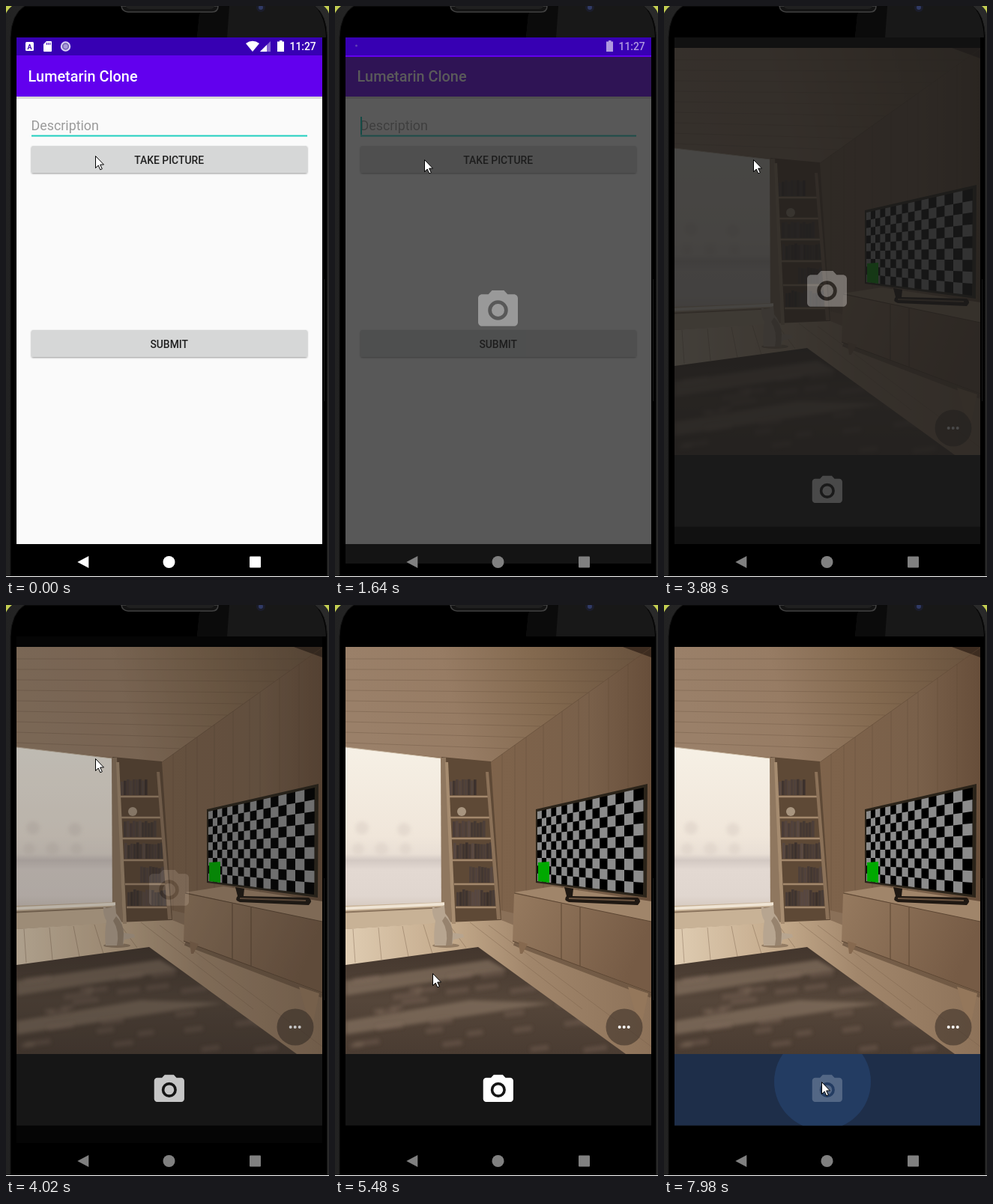
An HTML page that plays this animation: 431 by 763 pixels, repeating every 8 s.

```html
<!DOCTYPE html>
<html lang="en">
<head>
<meta charset="utf-8">
<title>Camera app</title>
<style>
html, body { margin: 0; width: 100%; height: 100%; overflow: hidden; background: #000; }
svg { display: block; width: 431px; height: 763px; }
text { font-family: Roboto, sans-serif; }
.label { font-size: 13.9px; font-weight: 500; text-anchor: middle; fill: #202020; }
</style>
</head>
<body>
<svg viewBox="0 0 431 763">
<defs>
  <linearGradient id="ceil" x2="1" y2="-.1">
    <stop offset="0" stop-color="#9a8069"/><stop offset=".3" stop-color="#977c64"/><stop offset=".6" stop-color="#83694f"/><stop offset="1" stop-color="#66503c"/>
  </linearGradient>
  <linearGradient id="wall">
    <stop offset="0" stop-color="#8a6e54"/><stop offset=".4" stop-color="#80644b"/><stop offset=".8" stop-color="#79604a"/><stop offset="1" stop-color="#674e3a"/>
  </linearGradient>
  <linearGradient id="sky" x2="0" y2="1">
    <stop offset="0" stop-color="#f6f0e5"/><stop offset=".55" stop-color="#f0e6da"/><stop offset=".66" stop-color="#e9dfd5"/>
    <stop offset=".7" stop-color="#d3c9c3"/><stop offset=".76" stop-color="#e3d9d2"/><stop offset=".92" stop-color="#e0d6cf"/><stop offset="1" stop-color="#d4c8be"/>
  </linearGradient>
  <linearGradient id="floor">
    <stop offset="0" stop-color="#dfccb2"/><stop offset=".35" stop-color="#c3a98a"/><stop offset=".6" stop-color="#a1866b"/><stop offset="1" stop-color="#8d7259"/>
  </linearGradient>
  <linearGradient id="rug" x2="0" y2="1">
    <stop offset="0" stop-color="#43362d"/><stop offset=".5" stop-color="#55463a"/><stop offset="1" stop-color="#4a3c32"/>
  </linearGradient>
  <linearGradient id="front" x2="1" y2=".3">
    <stop offset="0" stop-color="#967a5f"/><stop offset="1" stop-color="#765b45"/>
  </linearGradient>
  <linearGradient id="rim"><stop offset="0" stop-color="#222"/><stop offset=".5" stop-color="#3c3c3c"/><stop offset="1" stop-color="#292929"/></linearGradient>
  <filter id="soft"><feGaussianBlur stdDeviation="2.5"/></filter>
  <filter id="shade" x="-5%" y="-20%" width="110%" height="150%"><feDropShadow dx="0" dy="1" stdDeviation=".8" flood-opacity=".4"/></filter>
  <clipPath id="button"><rect x="34" y="187" width="368" height="36" rx="2"/></clipPath>
  <clipPath id="panel"><rect x="14" y="600" width="408" height="95.500"/></clipPath>
  <clipPath id="rugClip"><path d="M14 481L191 457 388 600H14Z"/></clipPath>
  <clipPath id="view"><rect x="14" y="56" width="408" height="544"/></clipPath>
  <path id="cam" d="M9 2L7.17 4H4C2.9 4 2 4.9 2 6V18C2 19.1 2.9 20 4 20H20C21.1 20 22 19.1 22 18V6C22 4.9 21.1 4 20 4H16.83L15 2ZM12 17A5 5 0 1 1 12 7A5 5 0 1 1 12 17ZM12 8.8A3.2 3.2 0 1 0 12 15.2A3.2 3.2 0 1 0 12 8.8Z" fill-rule="evenodd"/>
</defs>

<!-- Phone body -->
<path d="M0 0H12L0 12ZM431 0H421L431 12Z" fill="#c4cf52"/>
<path d="M0 763V10Q2 5 8 0H424Q429 4 431 10V763Z" fill="url(#rim)"/>
<path d="M6 763V42Q7 11 25 0H412Q428 12 428.500 42V763Z" fill="#000" stroke="#151515"/>
<path d="M255 42L258 12 264 0H412Q426 14 427 42Z" fill="#181818"/>
<path d="M255 42L258 12 264 0H298L295 42Z" fill="#0b0b0b"/>
<path d="M154 0Q155 8 163 8H275Q283 8 283 0Z" fill="#141414" stroke="#424242" stroke-width="1.500"/>
<path d="M160 0Q161 4 166 4H272Q277 4 278 0Z" fill="#202020"/>
<circle cx="340" cy="2" r="6" fill="#1b1d2b"/><circle cx="340" cy="2" r="3" fill="#303a66"/>
<path d="M424.500 365V528" stroke="#191919"/>
<path d="M0 762.500H431" stroke="#fff"/>

<!-- Form -->
<rect x="14" y="42" width="408" height="677" fill="#fafafa"/>
<rect x="14" y="121" width="408" height="3" fill="#000" opacity=".14"/>
<rect x="14" y="66" width="408" height="55" fill="#6200ee"/>
<rect x="14" y="42" width="408" height="24" fill="#3700b3"/>
<text x="29.500" y="101" font-size="19.860" font-weight="500" fill="#fff">Lumetarin Clone</text>
<text x="33.500" y="166" font-size="17.870" fill="#9b9b9b">Description</text>
<path d="M34 173.500H402" stroke="#20cfc0" stroke-width="1.800"/>
<path id="caret" d="M35 148V172" stroke="#03c9b6" stroke-width="2"/>
<g fill="#d6d7d7" filter="url(#shade)"><rect x="34" y="187" width="368" height="36" rx="2"/><rect x="34" y="433" width="368" height="36" rx="2"/></g>
<circle id="tap" cx="137.500" cy="205" r="30" opacity=".1" clip-path="url(#button)"/>
<text class="label" x="217.700" y="211">TAKE PICTURE</text>
<text class="label" x="217.700" y="456.500">SUBMIT</text>

<!-- Opening camera -->
<g id="splash">
  <rect x="14" y="42" width="408" height="677" fill="#1c1c1c"/>
  <use href="#cam" transform="translate(185.700 348.700) scale(2.650)" fill="#757575"/>
</g>
<path id="bands" d="M14 42H422V56H14ZM14 696H422V719H14Z" fill="#161616"/>

<g id="icons" fill="#fff">
  <rect x="26" y="48" width="11" height="12" rx="1.500"/>
  <text x="31.500" y="57.500" font-size="9" font-weight="700" text-anchor="middle" fill="#3700b3">A</text>
  <path d="M54 47H60Q61 47 61 48V60Q61 61 60 61H51Q50 61 50 60V51Z"/>
  <path d="M54.500 49V52M56.700 49V52M58.900 49V52" stroke="#3700b3"/>
  <circle cx="79.500" cy="54" r="5.700" fill="#7463b5" stroke="#d9d1f2" stroke-width="2"/><circle cx="79.500" cy="54" r="3" fill="#a99ad9"/>
  <path d="M320 50Q329 43.500 338 50L329 61Z"/>
  <path d="M353 47V61H339Z" opacity=".4"/><path d="M348 52V61H339Z"/>
</g>
<circle id="dot" cx="28.500" cy="53" r="1.500" fill="#8c7bb8" opacity=".5"/>
<g id="clock" fill="#fff">
  <path d="M365 46H368.500V47.500H371V61H362V47.500H365Z"/>
  <text x="378.500" y="59" font-size="13.900" font-weight="500">11:27</text>
</g>

<!-- Viewfinder -->
<g id="camera">
  <rect x="14" y="42" width="408" height="677"/>
  <g clip-path="url(#view)">
    <path d="M14 56H422V600H14Z" fill="url(#wall)"/>
    <path d="M14 56H422L208 210 145 204 14 190Z" fill="url(#ceil)"/>
    <path d="M384 56H422V70Z" fill="#3d2c20"/>
    <path id="boards" stroke="#4f3c2c" stroke-width=".8" opacity=".3" fill="none"/>
    <path d="M422 57L208 210" stroke="#5d4734" opacity=".5"/>
    <path d="M142 203L208 209 222 425H142Z" fill="#5e4936"/>
    <path d="M14 190L142 205V400L14 406Z" fill="url(#sky)"/>
    <g fill="#ddd2c8" opacity=".6" filter="url(#soft)">
      <circle cx="36" cy="298" r="9"/><circle cx="31" cy="326" r="8"/><circle cx="62" cy="326" r="9"/><circle cx="92" cy="300" r="9"/><circle cx="94" cy="326" r="8"/>
    </g>
    <path d="M14 190L142 205" stroke="#c9b8a2"/>
    <path d="M141 204H148L156 425H142Z" fill="#8f775f"/>
    <path d="M14 402L146 397V425L14 433Z" fill="#c8b296"/>
    <path d="M14 405.500L146 399.500" stroke="#efe4d4" stroke-width="4"/>
    <path d="M14 410.500L148 404" stroke="#8b745d" stroke-width="2"/>
    <path d="M14 433L150 424 222 421 240 424 422 440V600H14Z" fill="url(#floor)"/>
    <path d="M58 431L62 474M24 433L27 478M90 429L98 470M118 427L130 466M150 424L175 458M180 424L330 540M205 428L422 590" stroke="#755d46" opacity=".4" fill="none"/>
    <path d="M222 408L239 412V428L222 421Z" fill="#8a7058"/>
    <path d="M14 481L191 457 388 600H14Z" fill="url(#rug)"/>
    <g id="streaks" clip-path="url(#rugClip)"></g>
    <g id="books"></g>
    <path d="M152 256H205M153 284H208M155 312H211M157 341H213M159 373H216M161 404H218" stroke="#a3886c" stroke-width="2.500"/>
    <circle cx="169" cy="276" r="6" fill="#a8957f"/>
    <path d="M147 210H151L161 426H156Z" fill="#a68c70"/><path d="M201 223H205L221 420H216Z" fill="#8b7158"/>
    <!-- Cat -->
    <ellipse cx="148" cy="455" rx="18" ry="3" fill="#765f4b" opacity=".6"/>
    <path d="M130 403L134 405 140 404 146 401 147 412Q156 422 157 438L171 440 172 444 158 447 156 455H133Q131 440 134 422Q129 414 130 403Z" fill="#b7a590"/>
    <path d="M147 416Q157 426 157 439L156 455H148Q152 436 143 422Z" fill="#97836e"/>
    <!-- Sideboard and television -->
    <path d="M239 384L290 376 422 396V424Z" fill="#a0856a"/>
    <path d="M239 452L422 522" stroke="#5c4734" stroke-width="6" opacity=".6"/>
    <path d="M239 385L422 423V518L237 449Z" fill="url(#front)"/>
    <path d="M239 385L422 423M302 399V473M327 404V482M237 449L422 518" stroke="#5c4633" fill="none"/>
    <path d="M245 449L257 453 250 466H247Z" fill="#86694f"/><path d="M391 510L418 519 410 557 403 554Z" fill="#94775b"/>
    <path d="M306 377L318 379 317 389 404 391Q410 395 404 401L312 397Q304 394 309 389Z" fill="#1f1812"/>
    <path d="M312 392L400 395" stroke="#6c5541" stroke-width="2"/>
    <path d="M268 273L417 239 416 391 268 371Z" fill="#2b241a"/>
    <path d="M270 276L412 244 411 387 270 369Z"/>
    <path id="checks" fill="#8b8b8b"/>
    <path d="M271 344L286 343 286 371 271 369Z" fill="#00a900"/>
  </g>
  <circle cx="386" cy="564" r="24.500" fill="#3d3129" opacity=".6"/>
  <g fill="#fff"><circle cx="379.700" cy="564" r="2"/><circle cx="385.700" cy="564" r="2"/><circle cx="391.700" cy="564" r="2"/></g>
  <rect x="14" y="600" width="408" height="95.500" fill="#151515"/>
  <g id="press" clip-path="url(#panel)">
    <rect x="14" y="600" width="408" height="96" fill="#1e2e49"/>
    <circle id="wave" cx="211.500" cy="637" fill="#233c62"/>
  </g>
  <use id="shutter" href="#cam" transform="translate(193.700 623.800) scale(2.010)" fill="#fff"/>
</g>

<g id="nav" fill="#fff">
  <path d="M95.300 743L110.300 735V751Z"/>
  <circle cx="217.500" cy="743" r="8"/>
  <rect x="325" y="735.500" width="15" height="15" rx="1"/>
</g>
<path id="cursor" d="M.5.5V16.500L4.200 13 6.800 18.800 9.300 17.700 6.700 12H11.500Z" fill="#fff" stroke="#000"/>
</svg>

<script>
const $ = id => document.getElementById(id);
const set = (id, attrs) => { for (const k in attrs) $(id).setAttribute(k, attrs[k]); };
const show = (id, on) => set(id, { visibility: on ? 'visible' : 'hidden' });

let seed = 7;
const rnd = () => (seed = seed * 16807 % 2147483647) / 2147483647;

function buildRoom() {
  let d = '';
  for (let i = 0; i < 9; i++) d += `M14 ${72 + i * 14}L${400 - i * 21} ${72 + i * 15}`;
  for (const x of [223, 240, 255, 278, 303, 325, 339, 365, 391]) d += `M${x} ${57 + (422 - x) * .715}V${x < 239 ? 410 : 384}`;
  set('boards', { d });

  // Perspective grid: 16 by 9 cells, the right edge nearer
  const point = (c, r) => {
    const u = c / 16, v = r / 9, k = u / (u + (1 - u) * 1.54);
    const top = 276 - 32 * k, bottom = 369 + 18 * k;
    return `${(270 + 141.5 * k).toFixed(1)} ${(top + (bottom - top) * v).toFixed(1)}`;
  };
  d = '';
  for (let c = 0; c < 16; c++)
    for (let r = c % 2; r < 9; r += 2)
      d += `M${point(c, r)}L${point(c + 1, r)} ${point(c + 1, r + 1)} ${point(c, r + 1)}Z`;
  set('checks', { d });

  const rows = [[153, 188, 254], [157, 200, 310], [158, 208, 339], [179, 213, 371], [162, 212, 402]];
  let books = '';
  for (const [x0, x1, y] of rows)
    for (let x = x0; x < x1; x += 4) {
      const h = 18 + rnd() * 4, l = 20 + rnd() * 11;
      books += `<rect x="${x}" y="${y - h}" width="3.600" height="${h}" fill="hsl(18 15% ${l}%)"/>`;
    }
  $('books').innerHTML = books;

  // Sunlight across the rug
  let streaks = '<path d="M14 502L205 474 230 488 14 522ZM14 556L180 528 290 532 14 574Z" fill="#8e7a68" opacity=".6" filter="url(#soft)"/><g filter="url(#soft)">';
  for (let i = 0; i < 30; i++) {
    const x = 14 + rnd() * 320, y = 490 + rnd() * 110, w = 12 + rnd() * 25;
    streaks += `<path d="M${x} ${y}l${w} ${-w * .13}" stroke="#8a7664" stroke-width="7" opacity=".3"/>`;
  }
  $('streaks').innerHTML = streaks + '</g>';
}

// Each row: start time, then the values held until the next row
const held = (rows, t) => rows.filter(r => r[0] <= t).pop();
const path = [
  [0, 119, 200], [140, 119, 205], [4820, 129, 243], [4950, 146, 294],
  [5090, 178, 350], [5220, 200, 408], [5340, 165, 462], [5480, 130, 492],
  [5600, 144, 517], [5880, 166, 578], [6000, 183, 632], [6150, 192, 634],
  [6270, 198, 635], [6420, 205, 636], [6550, 209, 636], [6700, 210, 637]
];
const opening = [[0, 0, 26], [1640, .725, 26], [2920, 1, 7], [3040, 1, 0]];
const fade = [[0, 0], [3880, .2], [4020, .75], [4140, 1]];
const pressing = [[0, 0, 0, 1], [7850, .6, 40, .6], [7980, 1, 64.5, .22]];

function draw(t) {
  const [, x, y] = held(path, t);
  set('cursor', { transform: `translate(${x} ${y})` });
  show('caret', t >= 140);
  show('tap', t >= 390 && t < 1060);
  show('icons', t < 1060);
  show('dot', t >= 1060 && t < 3040);
  show('clock', t < 3040);
  set('clock', { opacity: t < 1060 ? 1 : .6 });
  set('nav', { fill: t < 1210 ? '#fff' : '#808080' });

  const [, alpha, drop] = held(opening, t);
  set('splash', { opacity: alpha, transform: `translate(0 ${drop})` });
  show('bands', t >= 3040);
  set('camera', { opacity: held(fade, t)[1] });

  const [, tint, radius, icon] = held(pressing, t);
  set('press', { opacity: tint });
  set('wave', { r: radius });
  set('shutter', { opacity: icon });
}

buildRoom();
const start = performance.now();
function tick() {
  draw((performance.now() - start) % 8000);
  requestAnimationFrame(tick);
}
tick();
</script>
</body>
</html>
```
